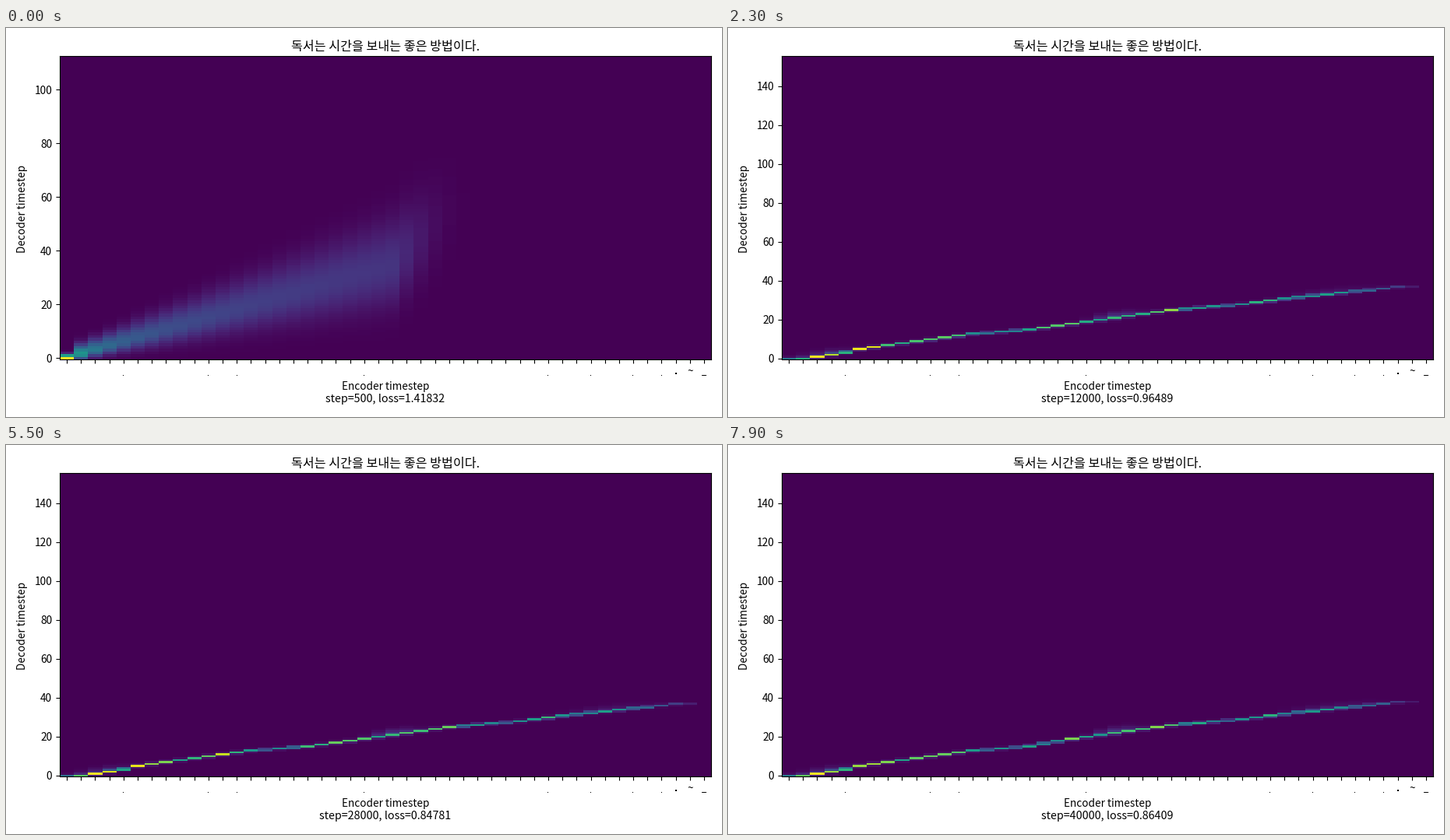
Recreate the animation shown at these times as a matplotlib script. Size 919x500 px, loop 8000 ms.

```python
import numpy as np
import matplotlib.pyplot as plt
from matplotlib.animation import FuncAnimation
from matplotlib.patches import Rectangle
from matplotlib.ticker import MultipleLocator

W, H, DPI = 919, 500, 128
FRAMES, INTERVAL = 80, 100
COLS = 46
col = np.arange(COLS)


def pt(px):
    return px * 72 / DPI


def keyed(x, *points):
    return np.interp(x, *zip(*points))


plt.rcParams.update({
    "font.family": "Noto Sans CJK JP",
    "font.size": pt(13.7),
    "axes.linewidth": pt(1.11),
})

# Settled alignment: decoder row and strength along the encoder columns
PATH = keyed(col, (0, 0), (1, .1), (2, 1), (4, 3.4), (5, 5), (8, 8),
             (13, 12.9), (17, 15), (20, 17.9), (23, 21), (27, 25),
             (32, 28), (36, 31.6), (43, 36.8), (45, 37))
PEAK = keyed(col, (0, .38), (2, 1), (6, .9), (8, .6), (11, .88), (14, .45),
             (20, .82), (22, .5), (27, .8), (31, .45), (34, .7), (40, .5),
             (44, .08), (45, 0))
# Haze where the attention stays uncertain
HALO = (.09 * np.exp(-((col - 2.5) / 1.5) ** 2)
        + .13 * np.exp(-((col - 23) / 1.5) ** 2)
        + .05 * np.exp(-((col - 38) / 3) ** 2))


def bell(rows, center, below, above):
    d = rows[:, None] - center
    return np.exp(-.5 * (d / np.where(d < 0, below, above)) ** 2)


def spread(reach):
    """Center, widths and strength of the untrained, diffuse alignment."""
    over = np.clip(col - reach, 0, None)
    center = 1.5 * col + 3.5 * np.minimum(over, 4)
    below = .8 + .4 * col
    peak = .53 * np.maximum(col, .2) ** -.4 * np.exp(-.2 * over - .1 * over ** 2)
    return center, below, below + 1.2 * np.minimum(col + .1, 1), peak


def settled_path(i):
    """The later columns drift up by about one row and back."""
    drift = .95 * max(0, np.cos(2 * np.pi * (i - 31) / 48)) ** 3
    lag = .4 * np.exp(-(i / 22) ** 4)
    return (PATH + drift * np.clip((col - 16) / 4, 0, 1)
            - lag * np.clip(col / 10, 0, 1))


def alignment(i):
    rows = np.arange(113 if i == 0 else 156)
    jitter = np.random.default_rng(100 + i).uniform(.88, 1.1, COLS)
    u = min(i / 7, 1) ** .6

    center, below, above, peak = spread(23 + 22 * u)
    center = center + (settled_path(i) - center) * u
    below, above = (w * (.42 / w) ** u for w in (below, above))
    peak = peak + (PEAK * jitter - peak) * u

    data = peak * bell(rows, center, below, above)
    data += u * HALO * bell(rows, center + .8, 1.3, 1.5)
    return np.clip(data, 0, 1)


def loss(i):
    return keyed(i, (0, 1.41832), (16, 1.01161), (31, .91150), (40, .95183),
                 (55, .84781), (64, .90679), (79, .86409))


fig = plt.figure(figsize=(W / DPI, H / DPI), dpi=DPI, facecolor="white")
ax = fig.add_axes([69 / W, 74 / H, 836 / W, 390 / H])


def label(x, y, text, size=13.6, **kw):
    return fig.text(x / W, 1 - y / H, text, fontsize=pt(size),
                    ha="center", va="baseline", **kw)


def mark(x, y, w=1, h=1):
    fig.add_artist(Rectangle((x / W, 1 - (y + h) / H), w / W, h / H,
                             color="black", lw=0))


image = ax.imshow(alignment(0), aspect="auto", origin="lower",
                  interpolation="nearest", cmap="viridis", vmin=0, vmax=1)
ax.set_xticks(col, [""] * COLS)
ax.yaxis.set_major_locator(MultipleLocator(20))
ax.tick_params(length=pt(4.9), width=pt(1.11), pad=pt(4.9))

label(486.5, 28.5, "독서는 시간을 보내는 좋은 방법이다.", 16.15)
label(487, 465, "Encoder timestep")
label(25, 232.5, "Decoder timestep", rotation=90, rotation_mode="anchor")
status = label(486.5, 481, "", 14.3)

# Clipped tips of the column labels
for c in (4, 10, 12, 21, 34, 37, 40, 42):
    mark(int(78 + 18.17 * c), 446)
mark(859, 443, 2, 2)
mark(893, 446, 6, 1)
label(878.5, 445.5, "~")


def update(i):
    data = alignment(i)
    top = len(data) - .5
    image.set_data(data)
    image.set_extent((-.5, COLS - .5, -.5, top))
    ax.set_xlim(-.5, COLS - .5)
    ax.set_ylim(-.5, top)
    status.set_text(f"step={500 * (i + 1)}, loss={loss(i):.5f}")
    return image, status


anim = FuncAnimation(fig, update, frames=FRAMES, interval=INTERVAL,
                     repeat=True, repeat_delay=0, blit=False)
plt.show()
```
